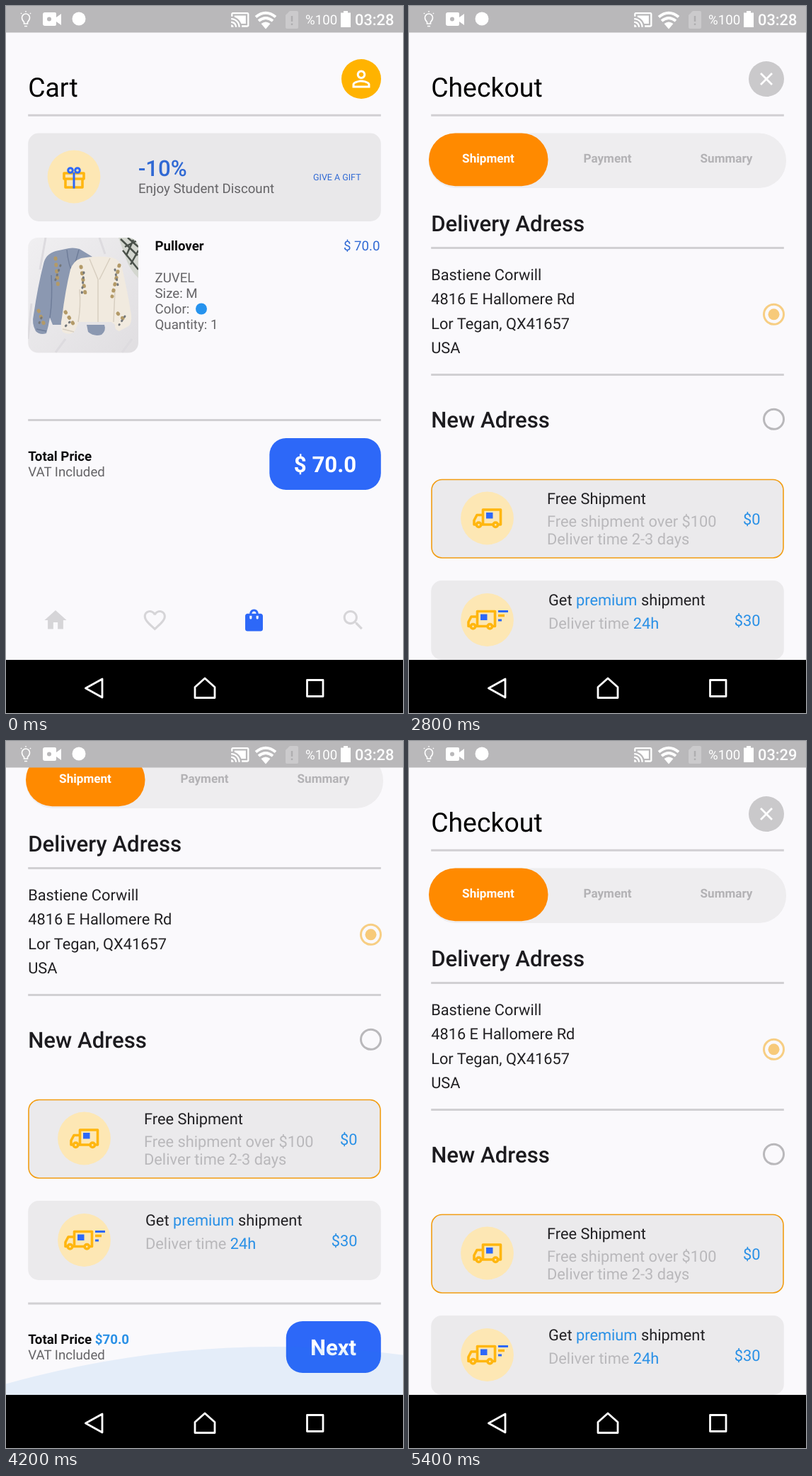
Recreate the animation shown at these times as an HTML page. Size 561 by 998 pixels, loop 5500 ms.

```html
<!DOCTYPE html>
<html lang="en">
<head>
<meta charset="utf-8">
<title>Cart and checkout</title>
<style>
html, body { margin: 0; width: 100%; height: 100%; overflow: hidden; background: #faf9fc; }
svg { display: block; width: 100%; height: 100%; }
text { font: 18.7px Roboto, sans-serif; fill: #656467; text-rendering: geometricPrecision; }
.xs { font-size: 12.47px; }
.tab { font-size: 17.14px; font-weight: 700; text-anchor: middle; fill: #b3b2b5; }
.md { font-size: 21.8px; fill: #222124; }
.lg { font-size: 31.16px; font-weight: 500; fill: #1c1b1f; }
.xl { font-size: 37.4px; fill: #000; }
.bold { font-weight: 700; fill: #0c0c0e; }
.cta { font-size: 31.16px; font-weight: 700; text-anchor: middle; }
.clock { font-size: 21.8px; font-weight: 500; }
.end { text-anchor: end; }
.pale { fill: #b9b8bb; }
.sky { fill: #2990e6; }
.blue { fill: #2d68f8; }
.ink { fill: #3069d4; }
.amber { fill: #ffb300; }
.cream { fill: #fde7b4; }
.white { fill: #fff; }
.card { fill: #ebeaec; }
.off { fill: #d6d5d8; }
.line { fill: none; stroke-width: 3; stroke: #d1d0d3; }
.gold { fill: none; stroke: #ffb60f; stroke-width: 3.6; stroke-linejoin: round; }
.cobalt { fill: none; stroke: #2d68f8; stroke-width: 3; }
.stitch { fill: none; stroke-linecap: round; }
</style>
</head>
<body>
<svg viewBox="0 0 561 998" preserveAspectRatio="none">
<defs>
  <clipPath id="frame"><rect x="31.200" y="327" width="155.800" height="162.500" rx="14"/></clipPath>
  <linearGradient id="sheet" x2="1" y2="1">
    <stop stop-color="#f0eff1"/><stop offset="1" stop-color="#e0dee1"/>
  </linearGradient>
  <g id="truck">
    <path class="gold" d="M104.500 732V711H129.500V732H126M118.500 732H102.500M94.500 732H92V726L96 718.500H104.500"/>
    <circle class="gold" cx="98.500" cy="732.300" r="3.200"/>
    <circle class="gold" cx="122.300" cy="732.300" r="3.200"/>
    <rect class="blue" x="109" y="715" width="9.500" height="8.500"/>
  </g>
</defs>
<rect width="561" height="998" fill="#faf9fc"/>

<g id="cart">
  <text class="xl" x="31.200" y="128">Cart</text>
  <circle class="amber" cx="502" cy="103" r="28"/>
  <path class="white" transform="translate(483.300 84.300) scale(1.558)" d="M12 5.9c1.160 0 2.100.940 2.100 2.100s-.940 2.100-2.100 2.100S9.900 9.160 9.900 8s.940-2.100 2.100-2.100m0 9c2.970 0 6.100 1.460 6.100 2.100v1.100H5.900V17c0-.640 3.130-2.100 6.100-2.100M12 4C9.790 4 8 5.790 8 8s1.790 4 4 4 4-1.790 4-4-1.790-4-4-4zm0 9c-2.670 0-8 1.340-8 4v3h16v-3c0-2.660-5.330-4-8-4z"/>
  <path class="line" d="M31.200 154.300H529.800M31.200 584.500H529.800"/>

  <rect x="31.200" y="179.500" width="498.600" height="124.500" rx="15" fill="#e9e8ea"/>
  <circle class="cream" cx="96" cy="241" r="37.400"/>
  <path class="gold" d="M82 236H110V244H82ZM84 244V256H108V244"/>
  <path class="cobalt" d="M96 235V257.500"/>
  <circle class="cobalt" cx="91" cy="232" r="3.300"/>
  <circle class="cobalt" cx="101" cy="232" r="3.300"/>
  <text class="lg ink" x="187" y="240">-10%</text>
  <text x="187" y="264">Enjoy Student Discount</text>
  <text class="xs ink" x="434" y="245.500">GIVE A GIFT</text>

  <g clip-path="url(#frame)">
    <rect x="31" y="327" width="156" height="163" fill="url(#sheet)"/>
    <path d="M56 327L48 372M132 327L140 350M36 420L31 470M70 489L84 470M178 470L164 489" stroke="#dddbdf" stroke-width="3"/>
    <path d="M159 327H187V384Q174 372 168 352Z" fill="#d3d6cf"/>
    <path d="M162 329L186 352M172 327L187 340M165 345L187 372M180 330L170 352M187 345L176 365M168 340L187 330" stroke="#4a514a" stroke-width="2.500"/>
    <!-- blue cardigan -->
    <path d="M84 343Q94 340 104 343L122 354L104 380L88 450H66L62 440Q60 452 57 462Q48 465 42 459Q36 448 39 436Q45 395 53 364Q56 350 70 346ZM114 450H139Q142 458 135 464Q124 467 116 460Z" fill="#8b98b1"/>
    <path d="M86 344Q88 366 96 382M103 344L98 362M64 380Q66 412 62 440M43 456L57 459" fill="none" stroke="#6f7d99" stroke-width="1.500"/>
    <!-- cream cardigan -->
    <path d="M106 356Q128 352 150 355Q161 358 164 370Q172 404 177 436Q178 448 173 452L160 459Q153 457 154 450L149 446H103L97 459Q90 466 80 460Q76 452 79 440Q84 400 91 372Q95 360 106 356Z" fill="#f1eadf"/>
    <path d="M118 357L130 386V446M147 356L132 386M104 400Q106 424 102 446M154 400L152 446M80 456L96 460" fill="none" stroke="#d8cfc1" stroke-width="1.500"/>
    <path class="stitch" d="M70 356L74 400M106 368L113 412M160 366L150 410M46 430L54 450M84 432L96 450M158 434L170 446" stroke="#b39a68" stroke-width="5" stroke-dasharray="1 8"/>
    <path class="stitch" d="M77 366L68 392M110 376L107 408M154 372L158 394M50 440L46 450M90 446L84 452M168 438L160 450" stroke="#74777a" stroke-width="3" stroke-dasharray="1 6"/>
  </g>
  <text class="bold" x="210.500" y="345">Pullover</text>
  <text class="ink end" x="528.500" y="345">$ 70.0</text>
  <text x="210.500" y="390">ZUVEL</text>
  <text x="210.500" y="412">Size: M</text>
  <text x="210.500" y="434">Color:</text>
  <circle cx="276" cy="427.500" r="8" fill="#2693ee"/>
  <text x="210.500" y="456">Quantity: 1</text>

  <text class="bold" x="31.200" y="642">Total Price</text>
  <text x="31.200" y="664">VAT Included</text>
  <rect class="blue" x="372.300" y="610" width="157.500" height="73" rx="23.400"/>
  <text class="cta white" x="451" y="658">$ 70.0</text>

  <g class="off">
    <path transform="translate(51.300 848.300) scale(1.558)" d="M10 20v-6h4v6h5v-8h3L12 3 2 12h3v8z"/>
    <path transform="translate(191.600 848.300) scale(1.558)" d="M16.500 3c-1.740 0-3.410.810-4.500 2.090C10.910 3.810 9.240 3 7.500 3 4.420 3 2 5.420 2 8.500c0 3.780 3.400 6.860 8.550 11.540L12 21.350l1.450-1.320C18.600 15.360 22 12.280 22 8.500 22 5.420 19.580 3 16.500 3zm-4.400 15.550l-.1.1-.1-.1C7.140 14.240 4 11.390 4 8.500 4 6.500 5.500 5 7.500 5c1.540 0 3.040.990 3.570 2.360h1.870C13.460 5.990 14.960 5 16.500 5c2 0 3.500 1.500 3.500 3.500 0 2.890-3.140 5.740-7.900 10.050z"/>
    <path class="blue" transform="translate(331.800 848.300) scale(1.558)" d="M18 6h-2c0-2.210-1.790-4-4-4S8 3.790 8 6H6c-1.100 0-2 .9-2 2v12c0 1.100.9 2 2 2h12c1.100 0 2-.9 2-2V8c0-1.100-.9-2-2-2zm-8 4c0 .550-.450 1-1 1s-1-.450-1-1V8h2v2zm2-6c1.100 0 2 .9 2 2h-4c0-1.100.9-2 2-2zm4 6c0 .550-.450 1-1 1s-1-.450-1-1V8h2v2z"/>
    <path transform="translate(472 848.300) scale(1.558)" d="M15.500 14h-.790l-.280-.270C15.410 12.590 16 11.110 16 9.500 16 5.910 13.090 3 9.500 3S3 5.910 3 9.500 5.910 16 9.500 16c1.610 0 3.090-.590 4.230-1.570l.270.280v.790l5 4.990L20.490 19l-4.990-5zm-6 0C7.010 14 5 11.990 5 9.500S7.010 5 9.500 5 14 7.010 14 9.500 11.990 14 9.500 14z"/>
  </g>
</g>

<g id="checkout">
  <g id="page">
    <text class="xl" x="31.200" y="128">Checkout</text>
    <circle cx="505" cy="103" r="25" fill="#cac9cb"/>
    <path d="M497 95L513 111M513 95L497 111" stroke="#fff" stroke-width="2.800"/>
    <path class="line" d="M31.200 154.300H529.800M31.200 341.500H529.800M31.200 520.500H529.800M31.200 956H529.800"/>

    <rect x="28" y="179.500" width="505" height="77.500" rx="38" fill="#eeedef"/>
    <rect x="28" y="179.500" width="168.500" height="74.700" rx="37.300" fill="#ff8a00"/>
    <text class="tab white" x="112" y="221">Shipment</text>
    <text class="tab" x="280.500" y="221">Payment</text>
    <text class="tab" x="448.500" y="221">Summary</text>

    <text class="lg" x="31.200" y="318">Delivery Adress</text>
    <text class="md" x="31.200" y="387">Bastiene Corwill</text>
    <text class="md" x="31.200" y="421">4816 E Hallomere Rd</text>
    <text class="md" x="31.200" y="455.500">Lor Tegan, QX41657</text>
    <text class="md" x="31.200" y="490">USA</text>
    <circle class="line" style="stroke:#f7ce83" cx="515.500" cy="435.300" r="14"/>
    <circle cx="515.500" cy="435.300" r="8" fill="#f7ca7a"/>
    <text class="lg" x="31.200" y="595">New Adress</text>
    <circle class="line" style="stroke:#b9b8bb" cx="515.500" cy="583.300" r="14"/>

    <rect class="card" x="32" y="668.500" width="497" height="110.500" rx="14.800" stroke="#f29d12" stroke-width="1.600"/>
    <circle class="cream" cx="110.500" cy="723" r="37.400"/>
    <use href="#truck"/>
    <text class="md" x="195" y="702.500">Free Shipment</text>
    <text class="md pale" x="195" y="735">Free shipment over $100</text>
    <text class="md pale" x="195" y="760">Deliver time 2-3 days</text>
    <text class="md sky end" x="496.500" y="731.500">$0</text>

    <rect class="card" x="31.200" y="811" width="498.600" height="112" rx="15"/>
    <circle class="cream" cx="110.500" cy="866.500" r="37.400"/>
    <use href="#truck" x="-8" y="143.500"/>
    <path class="cobalt" d="M126 854.500H140M126 867H131"/>
    <path class="gold" d="M126 860.500H135"/>
    <text class="md" x="197" y="846">Get <tspan class="sky">premium</tspan> shipment</text>
    <text class="md pale" x="197" y="879">Deliver time <tspan class="sky">24h</tspan></text>
    <text class="md sky end" x="496.500" y="875">$30</text>

    <text class="bold" x="31.200" y="1013">Total Price <tspan class="sky">$70.0</tspan></text>
    <text x="31.200" y="1035">VAT Included</text>
    <rect class="blue" x="395.800" y="981" width="134" height="73" rx="23.400"/>
    <text class="cta white" x="462.500" y="1029">Next</text>
  </g>
  <circle id="glow" cx="380" r="1400" fill="#2180e0"/>
</g>

<!-- system bars -->
<rect width="561" height="37.500" fill="#b9b8ba"/>
<g class="white">
  <path d="M25.500 25V22.500Q22.500 20 22.500 16.500A5.500 5.500 0 0 1 33.500 16.500Q33.500 20 30.500 22.500V25ZM26 28.500H30M28 8.500V7M22 11L21 10M34 11L35 10" fill="none" stroke="#fff" stroke-width="1.600"/>
  <path d="M55 9H69Q71 9 71 11V16L78 11V27L71 22V26Q71 28 69 28H55Q52 28 52 25V12Q52 9 55 9Z"/>
  <circle cx="61" cy="18.500" r="3" fill="#b9b8ba"/>
  <circle cx="103" cy="18" r="9.500"/>
  <path transform="translate(317 5.500) scale(1.150)" d="M21 3H3c-1.100 0-2 .9-2 2v3h2V5h18v14h-7v2h7c1.100 0 2-.9 2-2V5c0-1.100-.9-2-2-2zM1 18v3h3c0-1.660-1.340-3-3-3zm0-4v2c2.760 0 5 2.240 5 5h2c0-3.870-3.130-7-7-7zm0-4v2c4.970 0 9 4.030 9 9h2c0-6.080-4.930-11-11-11zM19 7H5v1.630c3.960 1.280 7.090 4.410 8.370 8.370H19V7z"/>
  <path d="M353 15.500Q367 4 381 15.500M357 21Q367 13 377 21" fill="none" stroke="#fff" stroke-width="4"/>
  <path d="M360.500 25Q367 20 373.500 25L367 32.500Z"/>
  <path d="M401 7H411Q413 7 413 9V30Q413 32 411 32H397Q395 32 395 30V13Z" fill="#cbcacc"/>
  <path d="M404 14V22M404 24.500V27" stroke="#b0afb1" stroke-width="2.500"/>
  <path d="M477 7H483V9.500H487V30H473V9.500H477Z"/>
  <text class="white" x="423" y="26">%100</text>
  <text class="clock white" id="clock" x="493" y="27"></text>
</g>
<rect y="923" width="561" height="75"/>
<path d="M136 950V976L112.500 963ZM281 949L295 961.500V976.500H267V961.500ZM425.500 951.500H448V974.500H425.500Z" fill="none" stroke="#fff" stroke-width="2.800" stroke-linejoin="round"/>
</svg>

<script>
const LOOP = 5500, STEP = 100;
const $ = id => document.getElementById(id);

// Keys are [time, value] pairs with straight lines between them.
function track(keys, t) {
  const i = keys.findIndex(k => k[0] > t);
  if (i < 0) return keys[keys.length - 1][1];
  if (i === 0) return keys[0][1];
  const [t0, a] = keys[i - 1], [t1, b] = keys[i];
  return a + (b - a) * (t - t0) / (t1 - t0);
}

const scroll = [[3500, 0], [3600, 20], [3700, 66], [3800, 113], [3900, 145], [4000, 162],
  [4800, 162], [4900, 159], [5000, 152], [5100, 139], [5200, 120], [5300, 40], [5400, 0]];
const glowTop = [[3900, 923], [4000, 890], [4100, 865], [4200, 855], [4700, 915]];
const glowAlpha = [[3900, 0], [4100, 0.1], [4200, 0.1], [4700, 0]];

function draw() {
  const now = performance.now() % LOOP;
  const t = Math.floor(now / STEP) * STEP;
  const paying = t >= 2800;
  $("cart").style.display = paying ? "none" : "";
  $("checkout").style.display = paying ? "" : "none";
  $("page").setAttribute("transform", `translate(0 ${-track(scroll, t)})`);
  $("glow").setAttribute("cy", track(glowTop, t) + 1400);
  $("glow").setAttribute("opacity", track(glowAlpha, t));
  $("clock").textContent = t < 4500 ? "03:28" : "03:29";
  requestAnimationFrame(draw);
}
draw();
</script>
</body>
</html>
```
